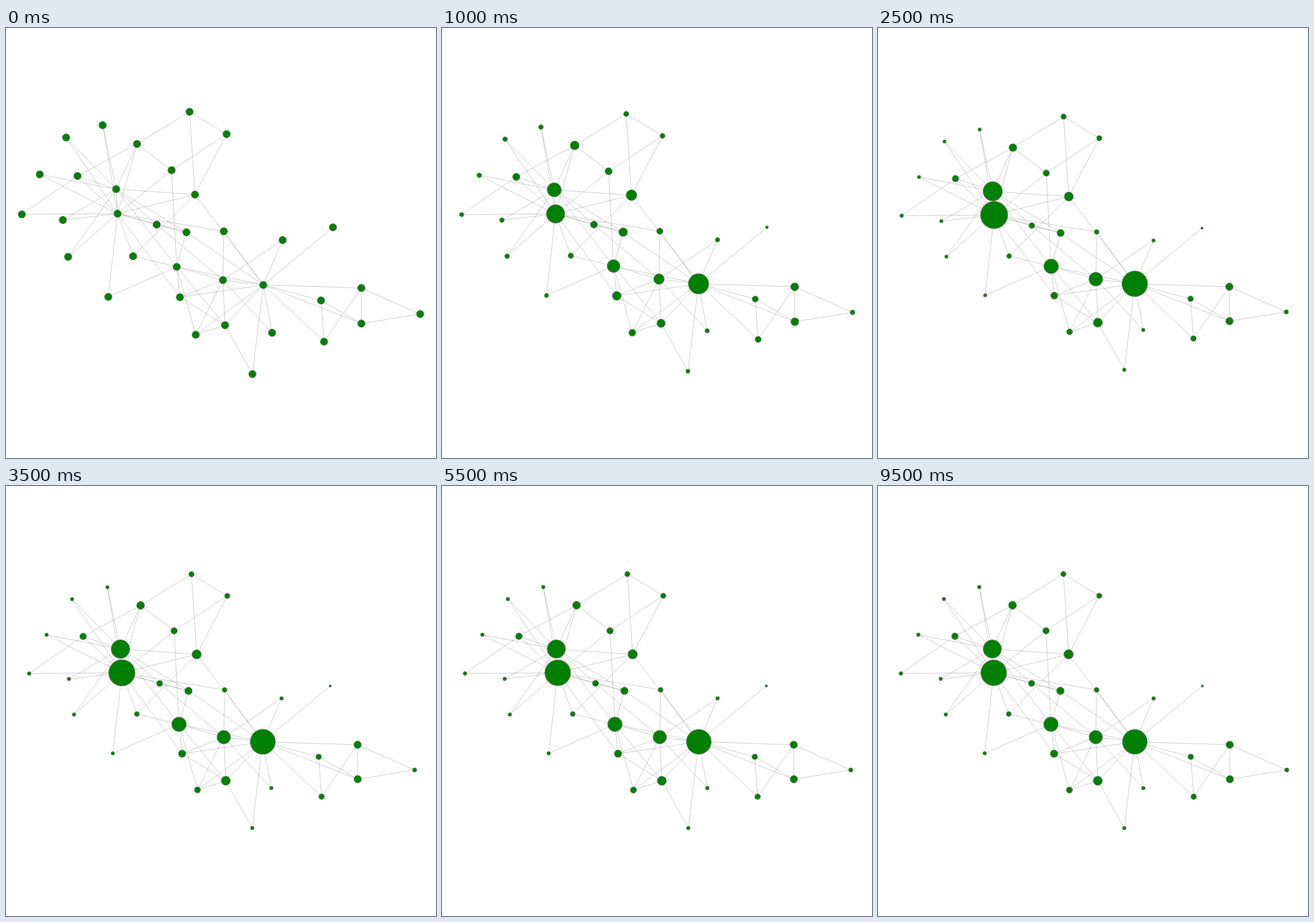
An HTML page with a canvas for the animation above (10 s loop, 748 by 748 pixels).

```html
<!DOCTYPE html>
<html lang="en">
<head>
<meta charset="utf-8">
<title>Rank iteration on a graph</title>
<style>
html, body { margin: 0; width: 100%; height: 100%; overflow: hidden; background: #fff; }
canvas { display: block; }
</style>
</head>
<body>
<canvas id="stage" width="748" height="748"></canvas>
<script>
const ctx = document.getElementById('stage').getContext('2d');
const SIZE = 748, STEP = 500, STEPS = 20, DAMPING = 0.85, BASE_RADIUS = 6.55;

// Key points of the layout, in drawing order.
const layout = [
  [447.5, 447], [377.3, 438.6], [296.8, 415.5], [381, 517], [548, 474],
  [618, 452.3], [618.2, 514.2], [330, 533.6], [313.8, 355.4], [177.8, 467.7],
  [553.2, 545.6], [568.7, 346.7], [428.6, 602], [302.4, 468.3], [168, 169],
  [104.5, 190.5], [720.5, 497.6], [481.2, 368.9], [58.6, 254.6], [378.8, 353.6],
  [98.8, 334], [462.8, 530.2], [108, 398], [227.8, 201.6], [383.6, 184.6],
  [319.2, 145.7], [27.4, 324.2], [288, 247.4], [221, 397], [124.3, 257.4],
  [262, 342], [328.6, 289.8], [191.5, 280.3], [194, 323]
];
const nodes = layout.map(([x, y]) => ({ x, y, degree: 0 }));
const RIGHT_HUB = 0, RIGHT_END = 16, LEFT_END = 26, LEFT_HUB = 33;

// Joins every hub to every member; members are numbered from 1.
const edges = [];
function fan(hubs, members) {
  for (const h of hubs) for (const m of members) {
    const edge = [nodes[h - 1], nodes[m - 1]];
    edge.forEach(node => node.degree++);
    edges.push(edge);
  }
}

// Right-hand community
fan([1, 2], [3, 4, 8, 14, 18, 20, 22]);
fan([1], [2, 5, 6, 7, 9, 11, 12, 13, 32]);
fan([3, 4], [8, 14]);
fan([5, 6], [7, 11]);
fan([17], [6, 7]);
fan([4], [3, 13]);
// Left-hand community
fan([33, 34], [9, 15, 16, 19, 21, 23, 24, 30, 31, 32]);
fan([34], [10, 14, 20, 27, 28, 29, 33]);
fan([24, 25], [26, 28]);
fan([32], [25, 26, 29]);
fan([30], [24, 27]);
// Bridges
fan([3], [9, 10, 28, 29, 33]);
fan([31], [2, 9]);

// Damped ranking: each step, a node shares its rank among its neighbours.
function rankAt(step) {
  nodes.forEach(node => node.rank = 1);
  for (let i = 0; i < step; i++) {
    nodes.forEach(node => node.next = 1 - DAMPING);
    for (const [a, b] of edges) {
      a.next += DAMPING * b.rank / b.degree;
      b.next += DAMPING * a.rank / a.degree;
    }
    nodes.forEach(node => node.rank = node.next);
  }
}

// The layout shrinks and shifts to leave room for the hubs.
function fit() {
  const radius = i => nodes[i].rank * BASE_RADIUS;
  const first = nodes[LEFT_END], last = nodes[RIGHT_END];
  const left = 13.8 + radius(LEFT_HUB) + 1.1 * radius(LEFT_END);
  const right = SIZE - 9.4 - 0.96 * radius(RIGHT_HUB) - 1.8 * radius(RIGHT_END);
  const scale = (right - left) / (last.x - first.x);
  const middle = SIZE / 2 + 0.36 * (radius(LEFT_HUB) - radius(RIGHT_HUB));
  for (const node of nodes) {
    node.px = left + (node.x - first.x) * scale;
    node.py = middle + (node.y - SIZE / 2) * scale;
  }
}

function draw(step) {
  rankAt(step);
  fit();
  ctx.clearRect(0, 0, SIZE, SIZE);
  ctx.strokeStyle = '#808080';
  ctx.fillStyle = '#008000';

  ctx.lineWidth = 0.42;
  for (const [a, b] of edges) {
    ctx.beginPath();
    ctx.moveTo(a.px, a.py);
    ctx.lineTo(b.px, b.py);
    ctx.stroke();
  }

  ctx.lineWidth = 1;
  for (const node of nodes) {
    ctx.beginPath();
    ctx.arc(node.px, node.py, node.rank * BASE_RADIUS, 0, 2 * Math.PI);
    ctx.fill();
    ctx.stroke();
  }
}

let shown = -1;
const start = performance.now();
function tick() {
  const step = Math.floor((performance.now() - start) / STEP) % STEPS;
  if (step !== shown) draw(shown = step);
  requestAnimationFrame(tick);
}
tick();
</script>
</body>
</html>
```
